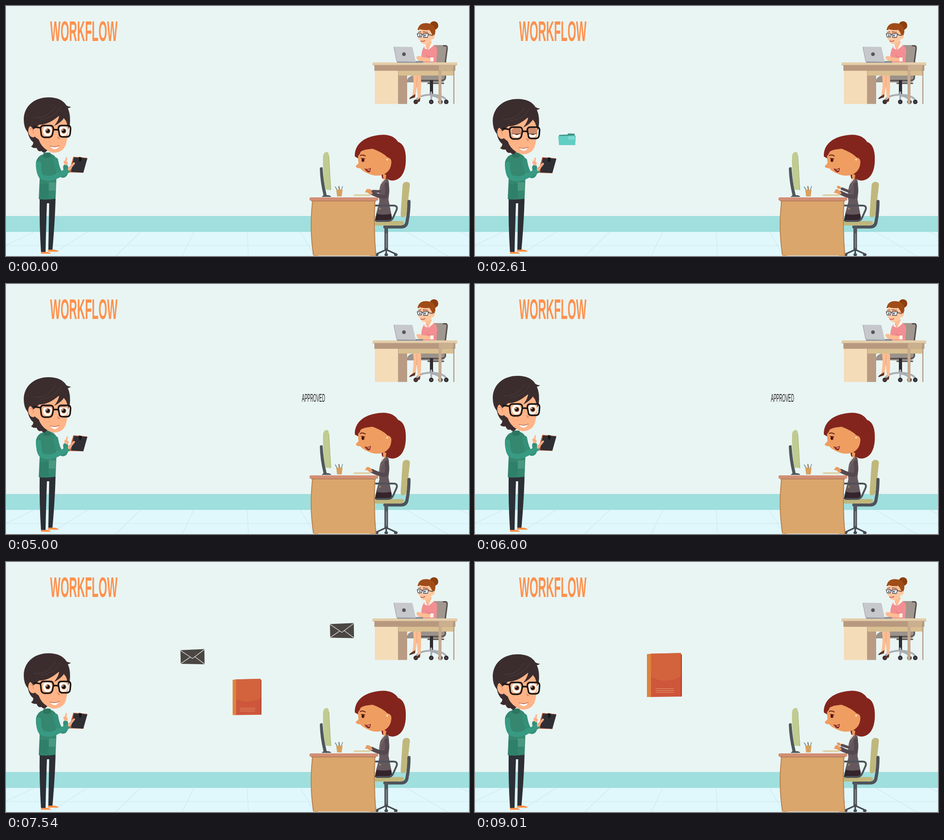
An HTML page with a canvas for the animation above (9090 ms loop, 1018 by 550 pixels).

```html
<!DOCTYPE html>
<html lang="en">
<head>
<meta charset="utf-8">
<title>Workflow</title>
<style>
html, body { margin: 0; width: 100%; height: 100%; overflow: hidden; background: #e9f5f3; }
canvas { display: block; }
</style>
</head>
<body>
<canvas id="stage" width="1018" height="550"></canvas>
<script>
const ctx = document.getElementById('stage').getContext('2d');
const LOOP = 9090, TAU = Math.PI * 2;
const clamp = v => Math.max(0, Math.min(1, v));
const pulse = (t, at, period) => Math.max(0, Math.cos(TAU * (t - at) / period)) ** 6;
const blink = (t, at) => clamp(1.5 - Math.abs(t - at) / 90);

function fill(color, path) {
  ctx.fillStyle = color;
  ctx.fill(new Path2D(path));
}
function line(color, width, path) {
  ctx.strokeStyle = color;
  ctx.lineWidth = width;
  ctx.stroke(new Path2D(path));
}
function rect(color, x, y, w, h) {
  ctx.fillStyle = color;
  ctx.fillRect(x, y, w, h);
}
function oval(color, x, y, rx, ry = rx, turn = 0) {
  ctx.fillStyle = color;
  ctx.beginPath();
  ctx.ellipse(x, y, rx, ry, turn, 0, TAU);
  ctx.fill();
}
function at(x, y, scale, alpha, draw) {
  if (alpha <= 0) return;
  ctx.save();
  ctx.translate(x, y);
  ctx.scale(scale, scale);
  ctx.globalAlpha = clamp(alpha);
  draw();
  ctx.restore();
}
// Tall, narrow lettering
function label(text, x, y, size, color, weight) {
  ctx.save();
  ctx.translate(x, y);
  ctx.scale(.388, 1);
  ctx.font = `${weight} ${size}px "Liberation Sans", Arial, sans-serif`;
  ctx.fillStyle = color;
  ctx.fillText(text, 0, 0);
  ctx.restore();
}

// Head height over time, cosine eased between the points
const BOB = [[0, 0], [460, 0], [1300, 4], [1950, -2], [2610, 3.5], [3200, -1], [3770, 2], [4350, -2],
  [5000, 4], [5650, -2], [6350, 4], [7010, 2], [8080, -2.5], [8600, 3], [9010, 2], [9090, 0]];
function bob(t) {
  const i = BOB.findIndex(k => k[0] > t);
  const [t0, a] = BOB[i - 1], [t1, b] = BOB[i];
  return a + (b - a) * (1 - Math.cos(Math.PI * (t - t0) / (t1 - t0))) / 2;
}

function room() {
  rect('#e9f5f3', 0, 0, 1018, 550);
  rect('#9fdfde', 0, 462, 1018, 35);
  rect('#e0f7fc', 0, 497, 1018, 53);
  for (let i = 0; i < 10; i++) {
    const x = 62 + i * 117;
    line('#cdeaef', 1.2, `M${x} 497L${x + (x - 517) * .247} 550`);
  }
  line('#cdeaef', 1.2, 'M0 527H1018');
  label('WORKFLOW', 97, 76.5, 62.5, '#ff914d', 'bold');
}

function officeDesk(t) {
  // Chair
  fill('#a0978f', 'M941 86H966Q971 86 971 92L967 125H938Z');
  line('#55504f', 3, 'M962 87.500H967Q970 88 970 93L966 124');
  fill('#9b928b', 'M881 168Q882 155 895 153H966V161Q964 168 955 168Z');
  line('#55504f', 3, 'M966 153V159Q965 163 957 164H912M928 170H962');
  rect('#2e2c30', 932, 163, 7, 33);
  line('#a9adb3', 4, 'M935 190V208M934 195Q908 196 902 207M937 195Q962 197 968 207M935 197Q952 199 955 208');
  for (const x of [901, 935, 955, 968]) {
    oval('#302d33', x, 211, 5);
    oval('#66646b', x, 211, 1.6);
  }
  // Legs and shoes
  fill('#fcbd92', 'M895 152H912Q914 175 911 204H906L903 176L900 201L893 199Q898 175 895 152Z');
  line('#e69f79', 1, 'M904 154L903 178');
  fill('#5b3327', 'M900 194L899 201L887 205Q886 202 893 198ZM911 202L910 210L897 214Q896 211 904 207Z');
  // Desk
  rect('#f4dcb8', 811, 142, 51, 73.500);
  rect('#b99b84', 862, 142, 20, 73.500);
  rect('#d9bf91', 863, 142, 122, 11);
  rect('#c6aa90', 951, 142, 6.500, 73.500);
  rect('#b79c88', 983.500, 142, 2.500, 73.500);
  rect('#b8997f', 810, 130, 178, 12.500);
  fill('#cbb08f', 'M952 130H984L982 142H952Z');
  rect('#e5cea9', 806, 124, 186, 6);
  line('#c3a68a', 1, 'M806 130H992');
  // Torso
  fill('#f38f92', 'M922 87Q914 93 913 111L917 124H946L948 99Q947 87 938 85Z');
  line('#dc747b', 1.2, 'M925 108Q930 115 938 112');
  fill('#fcbd92', 'M923 78H936V88L928 95L923 87Z');
  fill('#fff6ee', 'M921 84L927 96L920 93ZM936 80L940 87L928 97Z');
  const tap = Math.sin(t / 75) * .7;
  fill('#fcbd92', `M902 ${113 + tap}Q906 107 913 112L933 115V122H912Q905 121 902 ${113 + tap}Z`);
  rect('#fff4ee', 933, 113, 7, 9);
  // Head
  oval('#8d3e0e', 941, 43, 9.500);
  fill('#a04c18', 'M905 53Q908 36 927 38Q945 40 944 57Q943 66 937 71L924 52Z');
  fill('#fdc7a0', 'M909 50Q923 56 930 52Q937 55 938 64Q944 63 942 70Q939 75 936 72Q935 82 921 84Q912 83 910 75L906 71L909 65Z');
  fill('#a04c18', 'M905 53Q908 36 927 38Q940 41 942 54Q938 65 937 64Q935 57 930 52Q918 55 908 50Z');
  fill('#f7fbfc', 'M904 61H929V69H905Z');
  oval('#4a6470', 910, 65, 1.8);
  oval('#4a6470', 921, 65, 2);
  line('#4a3a3c', 1.3, 'M904 61H914V68H906ZM917 61H929L927 69H918ZM914 63H917M929 63L938 65');
  line('#7d3513', 1.3, 'M906 58L912 57M917 57L927 58');
  line('#c74d49', 1.6, 'M912 77Q917 79 921 76');
  oval('#fff3d0', 942, 72, 1.6);
  // Laptop
  fill('#8d929a', 'M860 121H917V125H860Z');
  fill('#c6c8cc', 'M852 91Q852 89 854 89.500L892 90Q894 90 894 92L901 123.500L859 123Z');
  line('#9da0a7', 1, 'M853 91L859 122L900 123');
  oval('#55575c', 875, 106, 4);
}

function manHead(lid) {
  fill('#3b2d2e', 'M39 249C40 220 62 201 94 201C112 201 126 207 133 219Q138 222 143 222Q139 225 136 225Q143 240 140 264L132 282L85 323Q80 322 78 319Q71 322 67 312Q61 314 55 309Q60 306 60 300Q51 293 48 278Q39 268 39 249Z');
  oval('#ffb488', 58, 276, 9, 13, -.15);
  line('#e68f6a', 1.4, 'M53 270Q60 269 60 280');
  fill('#ffb488', 'M65 262L80 256L122 240L136 258Q137 265 137 278Q135 290 133 299Q130 316 116 321Q103 326 90 317Q77 309 72 294L64 288Z');
  fill('#3b2d2e', 'M60 272Q66 268 73 261Q93 262 117 241Q116 251 106 264Q122 256 129 244Q132 253 136 265L140 258L137 229L95 205L50 225L47 264Q53 260 60 272Z');
  line('#50403f', 1, 'M62 245Q90 249 109 220M76 250Q107 246 121 221');
  for (const [x, px] of [[91, 92], [126, 127]]) {
    oval('#fffdf8', x, 275, 10, 11);
    oval('#8a4a25', px, 275, 5.5);
    oval('#17100f', px, 275, 3.6);
    oval('#fff', px - 2, 273, 1.3);
    if (lid > 0) {
      ctx.save();
      ctx.beginPath();
      ctx.rect(x - 12, 262, 24, 16 * lid);
      ctx.clip();
      oval('#cf8c6c', x, 275, 11, 12);
      ctx.restore();
      if (lid > .7) line('#4a2b21', 1.2, `M${x - 9} ${262 + 16 * lid}h18`);
    }
  }
  line('#1d1614', 3.4, 'M83 263H97Q105 263 104 273L102 283Q100 289 93 289H84Q77 288 77 278L76 270Q76 263 83 263ZM122 263H136Q142 263 142 270L141 281Q140 288 133 288H124Q117 288 117 280L115 270Q115 263 122 263ZM104 273Q109 271 115 273M76 268L62 266');
  line('#d9805d', 1.4, 'M113 288Q117 290 118 292L114 292');
  fill('#fff', 'M97 308Q108 312 117 307Q113 315 107 315Q100 314 97 308Z');
  line('#a8503d', 1.3, 'M97 308Q108 312 117 307');
  for (const [x, y] of [[84, 295], [95, 293], [95, 299], [89, 300]]) oval('#e9946d', x, y, .9);
}

function man(t) {
  const y = bob(t), tap = pulse(t, 7010, LOOP / 5);
  // Trousers and shoes
  fill('#2c2f36', 'M74 420H109Q108 470 102 538H93L95 434H90Q88 490 87 542H77Q73 480 74 420Z');
  fill('#ff8d42', 'M77 541H87Q97 541 99 545H77ZM93 536H103Q114 536 116 540.500H92Z');
  // Sweater
  fill('#35876f', 'M82 326Q69 330 66 343Q64 361 74 380L72 425Q91 427 109 424L111 374L114 345Q110 328 98 325Z');
  rect('#2f806a', 74, 391, 20, 33);
  rect('#4b9880', 94, 388, 15, 18);
  line('#26715e', 1.2, 'M75 352L80 378');
  fill('#2c7560', 'M82 324Q90 321 98 323L99 331Q90 337 82 332Z');
  at(0, y, 1, 1, () => manHead(Math.max(blink(t, 2610), blink(t, 5000) * .35, blink(t, 6150))));
  // Arms and tablet
  ctx.save();
  ctx.translate(0, y * .3);
  line('#35907a', 11, 'M109 339Q113 362 121 371Q130 376 132 362L131 354');
  fill('#d9643c', 'M148 331.500L178 334L170 367L138 366Z');
  fill('#302f34', 'M149 333L179 335L170 366.500L143 365Z');
  fill('#17171a', 'M160 332L167 333L165 342L161 342Z');
  line('#389a82', 11, 'M72 347Q71 369 79 376Q96 383 112 374L136 362');
  fill('#ffb68d', 'M136 357L149 344Q153 344 151 348L145 355Q141 363 137 362Z');
  line('#c56e51', 1, 'M139 356L151 347');
  ctx.translate(9 * tap, 7 * tap);
  fill('#ffb68d', 'M126 342Q126 339 129 340L131 333Q133 331 134 334L133 341Q138 344 134 350Q127 351 126 342Z');
  line('#e79470', .9, 'M128 343L133 345');
  ctx.restore();
}

function clerk(t) {
  const lift = pulse(t, 2610, LOOP / 10);
  // Chair
  fill('#c0b77c', 'M872 394Q874 386 881 387Q888 387 888 394L881 457Q879 466 870 465Q867 462 868 454Z');
  line('#4e5359', 7, 'M886 430Q886 453 882 473Q881 486 869 486H833');
  rect('#53575d', 832, 482, 8, 56);
  rect('#777d83', 835, 500, 3, 32);
  line('#464b51', 3.5, 'M836 536L814 546M836 536V549M836 536L858 546');
  for (const x of [815, 836, 857]) oval('#464b51', x, 547, 4, 3);
  // Body
  fill('#34242b', 'M815 454L846 455Q850 465 847 473H811Z');
  fill('#c0b77c', 'M811 473H868Q876 473 875 478Q873 484 863 483H811Z');
  fill('#83251d', 'M824 365L843 376L836 384L827 379Z');
  fill('#65585d', 'M832 377Q842 379 842 391Q843 410 841 426L847 457Q830 461 814 457L821 430Q817 397 832 377Z');
  fill('#f1dfce', 'M830 379L835 379L823 394Z');
  line('#887a7d', 1, 'M835 382L822 405L824 425');
  fill('#8d8264', 'M820 443L826 446L820 449Z');
  if (lift > .08) {
    line('#5a4d53', 6, `M822 408L807 ${408 - 6 * lift}`);
    oval('#e8965d', 800, 407 - 8 * lift, 4.5, 3, .5);
  }
  line('#55494f', 9, 'M837 393Q841 419 832 420Q822 420 804 411');
  const dab = Math.sin(t / 90) * .8 + 2 * lift;
  fill('#e99b62', `M805 410Q800 ${401 + dab} 793 403L789 ${410 + dab}Q795 ${409 + dab} 799 414L806 414Z`);
  line('#4e5359', 4, 'M812 439H849Q862 438 859 448L851 466Q848 473 839 473H815');
  // Head
  fill('#ec9a60', 'M829 364H838L834 383Q829 382 829 374Z');
  fill('#83251d', 'M767 331C766 306 785 288 819 284C842 281 855 288 862 299C877 304 880 324 879 342C878 368 867 383 850 384Q836 384 836 372Z');
  fill('#ef9d61', 'M774 331Q777 318 790 316L806 314Q828 322 839 333Q849 335 847 347Q846 360 835 368Q817 378 797 369Q783 363 779 357Q769 357 769 352L775 346Z');
  fill('#83251d', 'M767 331Q776 333 780 320Q789 315 806 313Q828 319 838 332L853 300L820 287L785 296Z');
  if (blink(t, 7010) > .5) {
    line('#642016', 1.5, 'M781 341Q785 344 789 340');
  } else {
    oval('#75251a', 785, 339, 3.2, 4.2);
    oval('#32100d', 784, 339, 1.8, 3);
    line('#642016', 1.4, 'M781 335L789 336');
  }
  line('#642016', 2, 'M779 329Q784 326 790 330');
  fill('#8f261f', 'M788 357Q795 361 802 356Q802 366 797 366Q791 364 788 357Z');
  fill('#fff2e8', 'M792 360Q797 361 800 359L799 362Z');
  oval('#fff7ee', 838, 338, 1.8);
  // Desk
  rect('#dba66b', 677, 543, 9, 7);
  rect('#dba66b', 800, 543, 13, 7);
  fill('#dba66b', 'M673 428H812Q809 489 814 549H675Q667 490 673 428Z');
  line('#b88352', 2, 'M674 430Q667 490 676 547M811 430Q808 489 813 548');
  rect('#b7805a', 671, 427, 143, 3);
  fill('#d28f75', 'M669 421H816Q819 421 818 428H668Q666 423 669 421Z');
  // Screen, cup and keyboard
  fill('#50575c', 'M690 358Q690 354 696 355Q698 388 705 416Q714 416 715 420H694L698 416Q691 388 690 358Z');
  fill('#c0cb91', 'M697 331Q698 321 706 321Q710 322 710 331L715 405L702 404Q696 367 697 331Z');
  line('#a8b878', 1.2, 'M710 330L714 404');
  line('#6b9ca8', 2, 'M729 406L724 398');
  line('#7d5a45', 2, 'M733 405L732 397');
  line('#81a4ae', 2, 'M737 405L740 397');
  fill('#d8a15f', 'M726 404H740L738 419H728Z');
  fill('#e9dfb8', 'M765 414H800L803 418.500H763Z');
  line('#b9ad87', .8, 'M767 416H800');
}

function folder() {
  fill('#3f9184', 'M-28 17V-16L2 -17L4 -21L27 -20V17Z');
  fill('#60cec3', 'M-31 -12L31 -14L29 20H-28Z');
  fill('#83dad1', 'M4 -10H27V0H4Z');
  line('#4dbbb0', 1, 'M-28 19H29');
}
function envelope() {
  fill('#494643', 'M-33.500 -18L33 -21L33.500 21L-32.500 20Z');
  line('#d9d4cb', 1.8, 'M-33 -17L0 5L33 -20M-32 19L-6 1M33 20L6 0');
}
function book() {
  fill('#963d2b', 'M34 -47L38.500 -45V47L34 48Z');
  fill('#ce563b', 'M-30 -47L36.500 -48.500V47.500L-30 48.500Z');
  fill('#d2633c', 'M-30 -47L36.500 -48.500V3Q2 22 -30 4Z');
  fill('#de843c', 'M-38.500 -46L-29.500 -47V48.500H-38.500Z');
  line('#e59a6f', 1, 'M-19 30H21M-19 34H21M-19 38H21');
}

// A fades in over 70 ms and out over 90 ms
const shown = (t, from, to) => Math.min(clamp((t - from) / 70), clamp((to - t) / 90));

function parcels(t) {
  const fx = 202 + (t - 2610) * .2957;
  const fy = 173 + .00307 * (fx - 370) ** 2 + .0163 * Math.max(0, 248 - fx) ** 2;
  at(fx, fy, (38 + (t - 2610) * .0198) / 61, shown(t, 2520, 3960), folder);

  const rise = 1 - (1 - clamp((t - 4250) / 650)) ** 2;
  at(690 - 14 * rise, 310 - 60 * rise, .5 + .5 * rise, shown(t, 4250, 6500),
    () => label('APPROVED', -25.5, 8.5, 23.7, '#24211f', 'normal'));

  const u = clamp((t - 6636) / 2560), e = u * (2 - u);
  at(690 - 275 * e, 365 - 117 * e, (44 + 33 * e) / 77, shown(t, 6690, LOOP + 500), book);

  const ax = 617.5 - (t - 7010) * .3907;
  at(ax, 207.5 + .00192 * (ax - 430) ** 2, (39 + .067 * (ax - 199.5)) / 67, shown(t, 6820, 8220), envelope);

  const bx = 690.5 + (t - 7010) * .0907;
  at(bx, 105 + 4.4e-5 * Math.abs(840 - bx) ** 3, .79, shown(t, 6820, 8700), envelope);
}

const start = performance.now();
function draw(now) {
  const t = Math.max(0, now - start) % LOOP;
  ctx.lineJoin = 'round';
  ctx.lineCap = 'round';
  room();
  officeDesk(t);
  man(t);
  clerk(t);
  parcels(t);
  requestAnimationFrame(draw);
}
draw(start);
</script>
</body>
</html>
```
